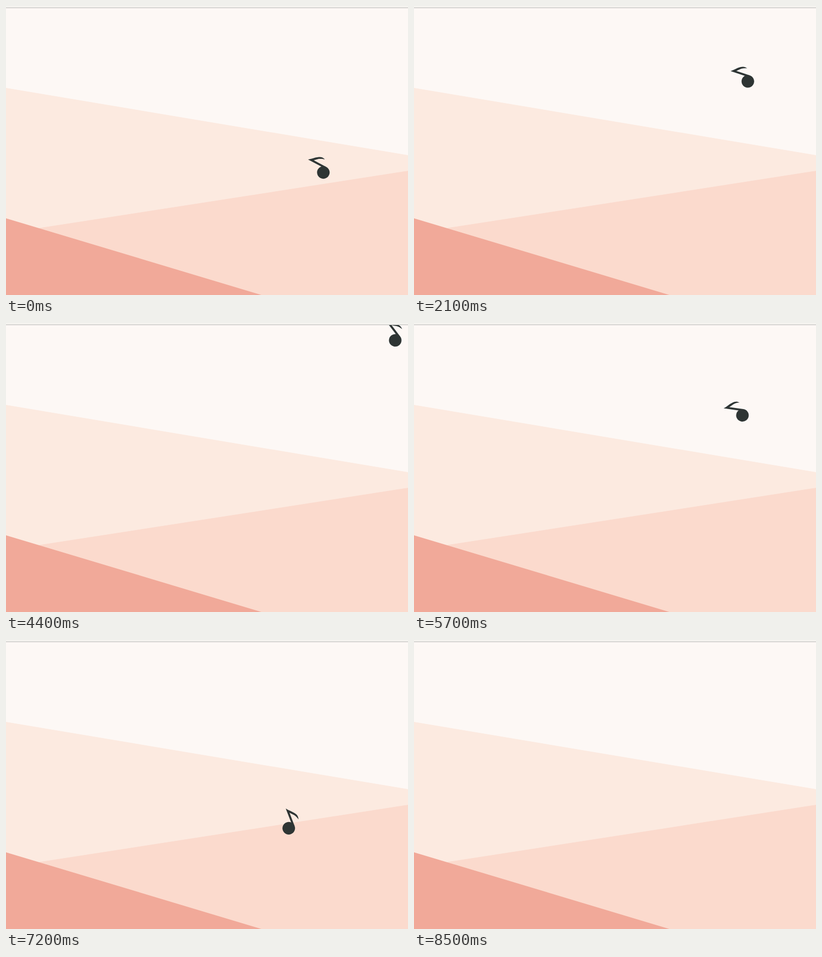
An HTML page that plays this animation: 768x554 px, repeating every 8800 ms.

```html
<!DOCTYPE html>
<html lang="en">
<head>
<meta charset="utf-8">
<title>Drifting note</title>
<style>
  html, body { margin: 0; width: 100%; height: 100%; overflow: hidden; background: #fdf8f5; }
  svg { display: block; }
</style>
</head>
<body>
<svg width="768" height="554" viewBox="0 0 768 554">
  <rect width="768" height="554" fill="#fdf8f5"/>
  <path fill="#fceae0" d="M0 157L768 286V554H0Z"/>
  <path fill="#fbdacd" d="M64 425.5L768 316V554H0Z"/>
  <path fill="#f1a999" d="M0 407L488 554H0Z"/>

  <path id="flight" fill="none"
    d="M454 396C462 376 496 372 525 365C622 341 617.3 299.8 622.5 240C617 110 698 61 779 11"/>
  <g id="note" fill="#2e3534">
    <circle r="12"/>
    <path d="M8.3 -6L8.7 -37.4C12 -32 18 -28 21.3 -22.5C24.5 -18 25.5 -14 23.5 -8.8
             C23 -12.5 21.3 -16.5 19.2 -19.5Q16 -23 12.4 -27L12 0Z"/>
  </g>

  <rect width="768" height="3" fill="#f3f2ee"/>
  <rect y="3" width="768" height="1" fill="#b9bab7"/>
</svg>
<script>
const flight = document.getElementById('flight');
const note = document.getElementById('note');
const flightLength = flight.getTotalLength();

const LOOP = 8800, STEP = 100;      // the picture advances in steps
const PERIOD = 1830, FLIGHT_TIME = 1490;
const OFFSET = 390;                 // the loop opens in mid-flight
const TILT = -5;                    // the note leans back from its heading

// Same meaning as CSS cubic-bezier(); solved by bisection.
function cubicBezier(x1, y1, x2, y2) {
  const curve = (a, b, u) => 3 * a * u * (1 - u) ** 2 + 3 * b * u * u * (1 - u) + u ** 3;
  return x => {
    let low = 0, high = 1;
    for (let i = 0; i < 30; i++) {
      const mid = (low + high) / 2;
      if (curve(x1, x2, mid) < x) low = mid; else high = mid;
    }
    return curve(y1, y2, low);
  };
}
const ease = cubicBezier(0.33, 0.14, 0.3, 0.885);

function draw() {
  const now = Math.floor(performance.now() % LOOP / STEP) * STEP;
  const progress = (now + OFFSET) % PERIOD / FLIGHT_TIME;

  const distance = ease(Math.min(progress, 1)) * flightLength;
  const head = flight.getPointAtLength(distance);
  const behind = flight.getPointAtLength(Math.max(distance - 1, 0));
  const ahead = flight.getPointAtLength(distance + 1);
  const heading = Math.atan2(ahead.y - behind.y, ahead.x - behind.x) * 180 / Math.PI;

  note.setAttribute('visibility', progress <= 1 ? 'visible' : 'hidden');
  note.setAttribute('transform', `translate(${head.x} ${head.y}) rotate(${heading + TILT})`);

  requestAnimationFrame(draw);
}
draw();
</script>
</body>
</html>
```
